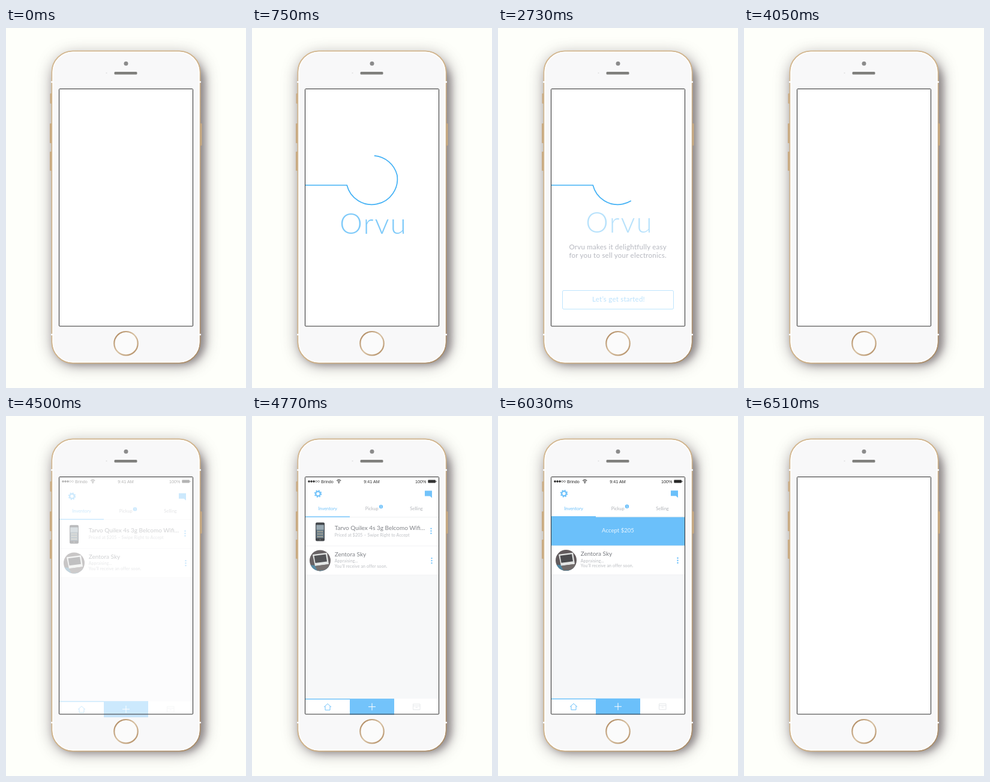
Write an HTML page that moves like this. It is 400x600 px and loops after 7170 ms.

```html
<!DOCTYPE html>
<html lang="en">
<head>
<meta charset="utf-8">
<title>Phone app intro</title>
<style>
  html, body { margin: 0; width: 100%; height: 100%; overflow: hidden; background: #fefffa; }
  svg { display: block; }
  text { font-family: Lato, "Open Sans", sans-serif; }
  .mid { text-anchor: middle; }
  .blue { fill: #5cbafa; }
  .word { font-size: 48px; font-weight: 300; letter-spacing: 2px; fill: #48b4f7; }
  .tag { font-size: 11.5px; letter-spacing: .25px; fill: #a0a3ad; }
  .cta { font-size: 11.5px; letter-spacing: .25px; fill: #6cc1fa; }
  .bar text { font: 7.2px "Liberation Sans", Arial, sans-serif; fill: #111; }
  .tab { font-size: 7.5px; }
  .title { font-size: 10px; fill: #6b6e74; }
  .sub { font-size: 7px; letter-spacing: .13px; fill: #b3b6bb; }
  .icon { fill: none; stroke-width: 1; }
</style>
</head>
<body>
<svg width="100%" height="100%" viewBox="0 0 400 600">
  <defs>
    <filter id="soft" x="-30%" y="-20%" width="160%" height="140%"><feGaussianBlur stdDeviation="12"/></filter>
    <filter id="near" x="-20%" y="-20%" width="140%" height="140%"><feGaussianBlur stdDeviation="6"/></filter>
    <linearGradient id="gold" x1="0" y1="0" x2="1" y2="1">
      <stop offset="0" stop-color="#d3b78f"/><stop offset=".5" stop-color="#d0b38a"/><stop offset="1" stop-color="#a98c6a"/>
    </linearGradient>
    <linearGradient id="ring" x1="0" y1="0" x2="1" y2="1">
      <stop offset="0" stop-color="#a98055"/><stop offset=".5" stop-color="#d9c3a5"/><stop offset="1" stop-color="#b08a60"/>
    </linearGradient>
    <clipPath id="round"><circle cx="113.5" cy="239.8" r="17.5"/></clipPath>
  </defs>

  <rect width="400" height="600" fill="#fefffa"/>

  <!-- phone -->
  <rect x="74" y="42" width="258" height="522" rx="40" fill="#6d6468" opacity=".5" filter="url(#soft)"/>
  <rect x="80" y="52" width="252" height="509" rx="38" fill="#5c5356" opacity=".5" filter="url(#near)"/>
  <g fill="#c8aa82">
    <rect x="73.5" y="109" width="3" height="17" rx="1"/>
    <rect x="73" y="159" width="3.5" height="33" rx="1"/>
    <rect x="73" y="206" width="3.5" height="32" rx="1"/>
    <rect x="323.5" y="159" width="3" height="37" rx="1"/>
  </g>
  <rect x="76.5" y="38.5" width="247" height="520" rx="35" fill="#f8f8f9" stroke="url(#gold)" stroke-width="2"/>
  <rect x="78.2" y="40.2" width="243.6" height="516.6" rx="33.5" fill="none" stroke="#fff" stroke-width="1.6"/>
  <path d="M75 90h4M321 90h4M75 511h4M321 511h4" stroke="#fff" stroke-width="2.5"/>
  <circle cx="200" cy="59.3" r="3.5" fill="#8b8b8b"/>
  <circle cx="167.5" cy="75" r="1" fill="#dedee0"/>
  <rect x="180.5" y="73" width="38" height="4.5" rx="1.5" fill="#7f7f7c"/>
  <circle cx="200" cy="525.7" r="19.7" fill="#fbfbfb" stroke="url(#ring)" stroke-width="2.2"/>
  <rect x="88.5" y="101.5" width="223" height="395.5" fill="#fff"/>

  <!-- welcome -->
  <path id="mark" d="M89 262H158.2A42.7 42.7 0 0 0 241.8 245A42.7 42.7 0 0 0 158.2 262" pathLength="1"
    fill="none" stroke="#43b1f5" stroke-width="1.7"/>
  <text id="word" class="word mid" x="202.5" y="341">Orvu</text>
  <g id="tag" class="tag mid">
    <text x="199.7" y="368.5">Orvu makes it delightfully easy</text>
    <text x="199.7" y="383">for you to sell your electronics.</text>
  </g>
  <rect id="box" x="107.5" y="437.5" width="185" height="31" rx="2" fill="none" stroke="#62c0fa"/>
  <text id="start" class="cta mid" x="200" y="456">Start Selling</text>
  <text id="go" class="cta mid" x="201" y="456">Let’s get started!</text>
  <circle id="tap" cx="253" cy="461" r="18" fill="#8fb9d6"/>

  <!-- inventory -->
  <g id="app">
    <rect x="89" y="102" width="222" height="66" fill="#fff"/>
    <g class="bar">
      <g fill="#111" stroke="#111" stroke-width=".5">
        <circle cx="95" cy="109" r="1.5"/><circle cx="99" cy="109" r="1.5"/><circle cx="103" cy="109" r="1.5"/>
        <circle cx="107" cy="109" r="1.5" fill="none"/><circle cx="111" cy="109" r="1.5" fill="none"/>
      </g>
      <text x="115" y="111.7">Brindo</text>
      <path d="M141.2 107.8a5 5 0 0 1 7 0M142.7 109.6a3 3 0 0 1 4 0" fill="none" stroke="#111" stroke-width="1.1"/>
      <circle cx="144.7" cy="111.3" r="1" fill="#111"/>
      <text class="mid" x="199.5" y="111.7">9:41 AM</text>
      <text x="272" y="111.7">100%</text>
      <rect x="293.3" y="106.6" width="12.6" height="5" rx=".8" fill="#111"/>
      <rect x="306.4" y="108" width="1" height="2.2" fill="#111"/>
    </g>

    <g id="body">
      <rect x="89" y="264" width="222" height="207" fill="#f6f7f9"/>
      <g fill="none" stroke="#5cbafa">
        <circle cx="110" cy="128.5" r="3.8" stroke-width="2.3"/>
        <circle cx="110" cy="128.5" r="5.5" stroke-width="1.6" stroke-dasharray="2.16"/>
      </g>
      <path class="blue" d="M288 123.5h12v12l-3.5-3h-8.5z"/>
      <text class="tab mid blue" x="126" y="156">Inventory</text>
      <g class="tab mid" fill="#a9acb1">
        <text x="199.8" y="156">Pickup</text>
        <text x="274" y="156">Selling</text>
      </g>
      <circle class="blue" cx="215" cy="150" r="3.2"/>
      <text class="mid" x="215" y="151.8" font-size="5" fill="#fff">1</text>

      <svg x="89" y="167" width="222" height="48.5">
        <g id="item">
          <rect width="222" height="49" fill="#fff"/>
          <rect x="17" y="9.5" width="15" height="31" rx="2" fill="#25282d"/>
          <rect x="18.2" y="13.5" width="12.6" height="22" fill="#4f6675"/>
          <rect x="18.2" y="13.5" width="12.6" height="8" fill="#879aa4"/>
          <path d="M20 24.5h9M20 28.5h9M20 33h9" stroke="#b3a78d" stroke-width="1.6" stroke-dasharray="1.7 .7"/>
          <circle cx="24.5" cy="38" r="1.2" fill="#555"/>
          <text class="title" x="48.7" y="22.3">Tarvo Quilex 4s 3g Belcomo Wifi…</text>
          <text class="sub" x="48.7" y="33">Priced at $205 – Swipe Right to Accept</text>
          <g class="blue"><circle cx="209.5" cy="19.5" r="1.2"/><circle cx="209.5" cy="23.5" r="1.2"/><circle cx="209.5" cy="27.5" r="1.2"/></g>
        </g>
        <svg id="accept" width="0" height="48.5">
          <rect class="blue" width="222" height="48.5"/>
          <text class="mid" x="111" y="26.7" font-size="9.6" fill="#e6f5ff">Accept $205</text>
        </svg>
      </svg>
      <path d="M163 167.5h148" stroke="#e8eaec" stroke-width=".8"/>
      <path d="M89 167h74" stroke="#5cbafa" stroke-width="1.5"/>

      <rect x="89" y="215.5" width="222" height="48.5" fill="#fff"/>
      <path d="M89 215.5h222M89 264h222" stroke="#eceef0" stroke-width=".8"/>
      <g clip-path="url(#round)">
        <rect x="95" y="221" width="38" height="38" fill="#50494b"/>
        <path d="M95 247l38 3v10h-38z" fill="#3c7896"/>
        <path d="M101 230l24-3 3 19-23 3z" fill="#e1e3e2"/>
        <path d="M103.5 232l19.5-2.5 2 12-19.5 2.5z" fill="#38383b"/>
        <path d="M105 249l23-3 1 9-20 2z" fill="#625b5a"/>
      </g>
      <text class="title" x="137.7" y="232.5">Zentora Sky</text>
      <text class="sub" x="137.7" y="243">Appraising...</text>
      <text class="sub" x="137.7" y="251.5">You’ll receive an offer soon.</text>
      <g class="blue"><circle cx="299.5" cy="236" r="1.2"/><circle cx="299.5" cy="240" r="1.2"/><circle cx="299.5" cy="244" r="1.2"/></g>

      <rect x="89" y="470" width="222" height="27" fill="#fff"/>
      <rect class="blue" x="163" y="470" width="74" height="27"/>
      <path d="M89 470.7h74" stroke="#5cbafa" stroke-width="1.5"/>
      <path class="icon" stroke="#5cbafa" d="M120 484l6-5.5 6 5.5M122 482.5v6.5h8v-6.5"/>
      <path class="icon" stroke="#fff" d="M194 483.5h12M200 477.5v12"/>
      <path class="icon" stroke="#e2e5e8" d="M268.5 479h11.5v9.5h-11.5zM268.5 482h11.5M272.5 484.5h3.5"/>
    </g>
  </g>
  <rect x="88.5" y="101.5" width="223" height="395.5" rx="1" fill="none" stroke="#2c2c2c"/>
</svg>

<script>
  const LOOP = 7170;
  const el = {};
  document.querySelectorAll("[id]").forEach(n => el[n.id] = n);

  const span = (t, a, b) => Math.min(1, Math.max(0, (t - a) / (b - a)));
  const sine = u => (1 - Math.cos(Math.PI * u)) / 2;
  const ramp = (t, a, b) => sine(span(t, a, b));
  const pulse = (t, a, b, c, d) => ramp(t, a, b) - ramp(t, c, d);
  const fade = (node, v) => {
    node.setAttribute("opacity", v.toFixed(3));
    node.style.display = v > 0.001 ? "" : "none";
  };
  const move = (node, x, y) => node.setAttribute("transform", `translate(${x} ${y})`);

  function draw(t) {
    const line = pulse(t, 120, 1050, 2190, 3210);
    el.mark.setAttribute("stroke-dasharray", `${line} 2`);
    fade(el.mark, line > 0.002 ? 1 : 0);

    fade(el.word, pulse(t, 300, 1020, 2460, 2930));
    move(el.word, 0, 45 * (1 - ramp(t, 120, 840)));
    fade(el.tag, pulse(t, 850, 1600, 2640, 2930));
    fade(el.box, pulse(t, 930, 1670, 2480, 2930));
    fade(el.start, pulse(t, 930, 1670, 2310, 2580));
    fade(el.go, pulse(t, 2550, 2930, 3750, 4050));

    fade(el.tap, 0.35 * pulse(t, 2190, 2310, 2400, 2670));
    el.tap.setAttribute("r", 18 + 10 * ramp(t, 2280, 2640));

    const shown = pulse(t, 4230, 4950, 5910, 6510);
    fade(el.app, shown);
    move(el.body, 0, 7.5 * (1 - shown));

    const swipe = 222 * ramp(t, 5100, 5730);
    move(el.item, swipe, 0);
    el.accept.setAttribute("width", swipe);
  }

  const begin = performance.now();
  function tick() {
    draw((performance.now() - begin) % LOOP);
    requestAnimationFrame(tick);
  }
  tick();
</script>
</body>
</html>
```
